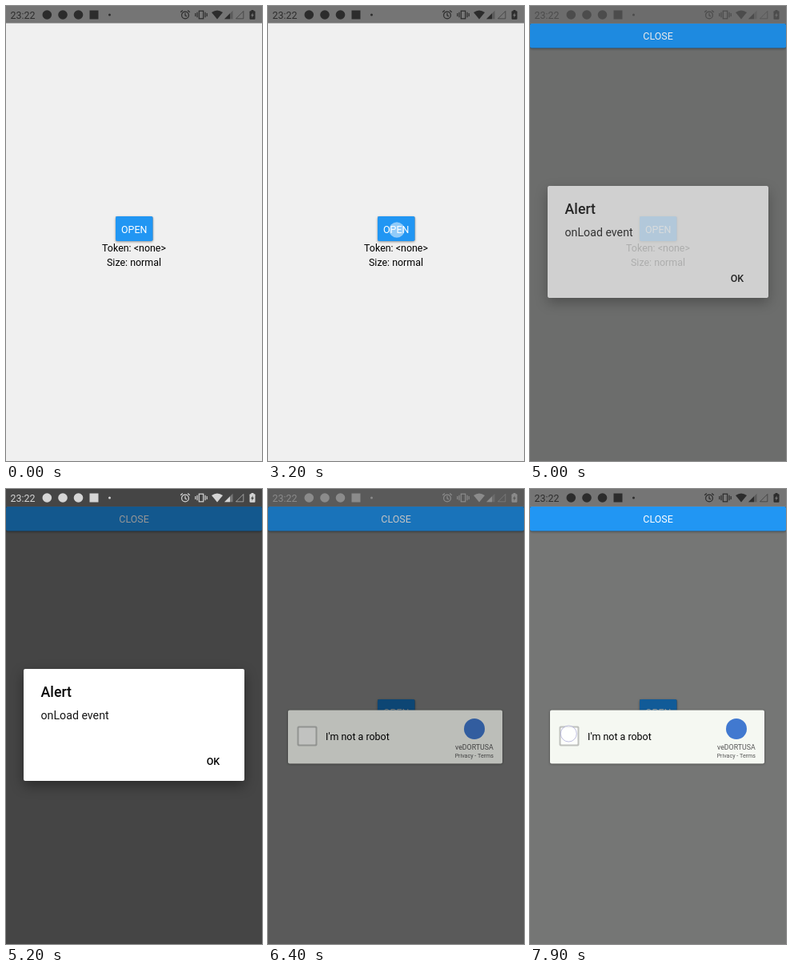
An HTML page with a canvas that plays this animation: 320 px wide and 569 px high, repeating every 8 s.

```html
<!DOCTYPE html>
<html lang="en">
<head>
<meta charset="utf-8">
<title>Verification dialog</title>
<style>
  html, body { margin: 0; width: 100%; height: 100%; overflow: hidden; background: #f0f0f0; }
  canvas { display: block; width: 100vw; height: 100vh; }
</style>
</head>
<body>
<canvas></canvas>
<script>
const W = 320, H = 569, LOOP = 8000, STEP = 100;
const BLUE = '#2196f3', BODY = 12.44;
const canvas = document.querySelector('canvas');
const ctx = canvas.getContext('2d');
const dpr = window.devicePixelRatio || 1;
canvas.width = Math.round(W * dpr);
canvas.height = Math.round(H * dpr);

const clamp = v => Math.max(0, Math.min(1, v));
const ease = v => { v = clamp(v); return v * v * (3 - 2 * v); };
const mix = (from, to, k) => 'rgb(' + from.map((c, i) => Math.round(c + (to[i] - c) * k)) + ')';

// Linear interpolation through [time, value] pairs.
function track(t, keys) {
  if (t <= keys[0][0]) return keys[0][1];
  for (let i = 1; i < keys.length; i++) {
    const [t0, v0] = keys[i - 1], [t1, v1] = keys[i];
    if (t <= t1) return v0 + (v1 - v0) * (t - t0) / (t1 - t0);
  }
  return keys[keys.length - 1][1];
}

const modalAt = t => track(t, [[3300, 0], [3600, 0.9], [3700, 1]]);
const dimAt = t => track(t, [[4900, 0], [5000, 0.15], [5200, 0.8], [5300, 1],
                             [6300, 1], [6400, 0.45], [6500, 0]]);
const alertAt = t => track(t, [[4900, 0], [5000, 0.68], [5100, 0.92], [5200, 1],
                               [6200, 1], [6300, 0.47], [6400, 0]]);

function text(str, x, y, size, color, align = 'left', weight = 400) {
  ctx.font = `${weight} ${size}px Roboto, sans-serif`;
  ctx.textAlign = align;
  ctx.fillStyle = color;
  ctx.fillText(str, x, y);
}

function box(x, y, w, h, r, color) {
  ctx.beginPath();
  ctx.roundRect(x, y, w, h, r);
  ctx.fillStyle = color;
  ctx.fill();
}

function disc(x, y, r, color) {
  ctx.beginPath();
  ctx.arc(x, y, r, 0, Math.PI * 2);
  ctx.fillStyle = color;
  ctx.fill();
}

function poly(points, closed = true) {
  ctx.beginPath();
  points.forEach(([x, y]) => ctx.lineTo(x, y));
  if (closed) ctx.closePath();
}

// Shadow is kept outside the box so translucent boxes stay clean.
function raised(x, y, w, h, color, blur, drop, strength) {
  ctx.save();
  ctx.beginPath();
  ctx.rect(0, 0, W, H);
  ctx.roundRect(x, y, w, h, 2);
  ctx.clip('evenodd');
  ctx.shadowColor = `rgba(0,0,0,${strength})`;
  ctx.shadowBlur = blur * dpr;
  ctx.shadowOffsetY = drop * dpr;
  box(x, y, w, h, 2, '#000');
  ctx.restore();
  box(x, y, w, h, 2, color);
}

function drawHome(modal) {
  ctx.fillStyle = '#f0f0f0';
  ctx.fillRect(0, 0, W, H);
  ctx.fillStyle = '#757575';
  ctx.fillRect(0, 0, W, 21.5);
  text('Token: <none>', 160, 307.3, BODY, '#000', 'center');
  text('Size: normal', 160, 324.5, BODY, '#000', 'center');

  ctx.fillStyle = `rgba(0,3,0,${0.51 * modal})`;
  ctx.fillRect(0, 21.5, W, H);
  raised(137, 263, 46.5, 31, mix([33, 150, 243], [17, 91, 152], modal), 3, 1, 0.4);
  text('OPEN', 160.2, 283.5, BODY, mix([255, 255, 255], [142, 156, 162], modal), 'center');
}

function drawCloseBar(modal) {
  ctx.globalAlpha = modal;
  raised(0, 22, W, 30.5, BLUE, 3, 1, 0.4);
  text('CLOSE', 160, 42, BODY, '#fff', 'center');
  ctx.globalAlpha = 1;
}

function drawSpinner(t) {
  const p = (t - 3600) / 1333;
  const k = p % 1;
  const base = -0.95 + p * 1.3 + Math.floor(p) * 4.7;
  const tail = base + 4.7 * ease(k * 2 - 1);
  const head = base + 0.75 + 4.7 * ease(k * 2);
  ctx.beginPath();
  ctx.arc(160, 295, 13, tail, head);
  ctx.strokeStyle = '#5f9c8c';
  ctx.lineWidth = 2.2;
  ctx.stroke();
}

function drawCheckCard() {
  raised(25, 276.5, 268, 67, '#f5f8f2', 3, 0.5, 0.4);
  box(36.5, 296.5, 25, 25, 2, '#bfc1bd');
  box(38.5, 298.5, 21, 21, 1, '#fcfdfb');
  text("I'm not a robot", 72, 314, BODY, '#000');
  disc(258, 300, 13, '#4179d0');
  text('veDORTUSA', 257.8, 326.3, 8.8, '#555', 'center');
  text('Privacy - Terms', 257.8, 336, 7.1, '#555', 'center');
}

function drawAlert(alpha) {
  ctx.globalAlpha = alpha;
  raised(22, 225, 276, 140, '#fff', 16, 6, 0.4);
  ctx.globalAlpha = 0.5 + alpha / 2;
  text('Alert', 43.5, 260.3, 17.8, '#050505', 'left', 500);
  text('onLoad event', 43.5, 287.5, 14.2, '#161616');
  text('OK', 259, 345, BODY, '#050505', 'center', 500);
  ctx.globalAlpha = 1;
}

function drawStatus(dim) {
  const c = mix([44, 44, 44], [255, 255, 255], dim);
  ctx.strokeStyle = c;
  ctx.lineWidth = 1.2;
  text('23:22', 5.5, 15.5, BODY, c);
  [51.3, 71, 90.5].forEach(x => disc(x, 11, 5.8, c));
  box(104.5, 5.5, 11, 11, 0, c);
  disc(129.5, 11, 1.5, c);

  // Alarm clock
  ctx.beginPath();
  ctx.arc(224, 11.5, 4.4, 0, Math.PI * 2);
  ctx.stroke();
  poly([[224, 8.8], [224, 11.8], [226, 13]], false);
  ctx.stroke();
  [-1, 1].forEach(s => {
    poly([[224 + s * 5.8, 7.8], [224 + s * 3.2, 5.5]], false);
    ctx.stroke();
  });

  // Vibrating phone
  ctx.strokeRect(241.3, 6.2, 5.4, 9.6);
  [[3.2, 5], [2, 7.2]].forEach(([half, dx]) => [-1, 1].forEach(s => {
    poly([[244 + s * dx, 11 - half], [244 + s * dx, 11 + half]], false);
    ctx.stroke();
  }));

  // Wi-Fi and two signal wedges
  ctx.fillStyle = c;
  ctx.beginPath();
  ctx.moveTo(264, 16.5);
  ctx.lineTo(257, 8);
  ctx.quadraticCurveTo(264, 3, 271, 8);
  ctx.fill();
  ctx.globalAlpha = 0.35;
  poly([[273, 16.3], [283.5, 16.3], [283.5, 5.8]]);
  ctx.fill();
  ctx.globalAlpha = 1;
  poly([[273, 16.3], [280, 16.3], [280, 9.3]]);
  ctx.fill();
  ctx.globalAlpha = 0.6;
  ctx.lineWidth = 1;
  poly([[287.5, 15.8], [296.8, 15.8], [296.8, 6.5]]);
  ctx.stroke();
  ctx.globalAlpha = 1;

  // Charging battery
  box(304.5, 6.2, 7, 10.6, 1, c);
  box(306.5, 5, 3, 2, 0, c);
  poly([[308.7, 8], [306, 12.2], [307.7, 12.2], [307.3, 15], [310, 10.8], [308.3, 10.8]]);
  ctx.fillStyle = mix([117, 117, 117], [56, 58, 54], dim);
  ctx.fill();
}

function drawTouch(x, y, r, alpha, rim) {
  disc(x, y, r, `rgba(255,255,255,${alpha})`);
  ctx.strokeStyle = rim;
  ctx.lineWidth = 1;
  ctx.stroke();
}

function draw(t) {
  const modal = modalAt(t), dim = dimAt(t), alert = alertAt(t);
  ctx.setTransform(canvas.width / W, 0, 0, canvas.height / H, 0, 0);
  drawHome(modal);
  if (modal > 0) drawCloseBar(modal);
  if (t >= 3700 && t < 5000) drawSpinner(t);
  if (t >= 5200) drawCheckCard();
  if (dim > 0) {
    ctx.fillStyle = `rgba(0,0,0,${0.52 * dim})`;
    ctx.fillRect(0, 0, W, H);
  }
  if (alert > 0) drawAlert(alert);
  drawStatus(dim);

  if (t >= 3200 && t < 3400) drawTouch(161, 280, 9.5, 0.5, 'rgba(255,255,255,0.15)');
  if (t >= 6200 && t < 6400) drawTouch(260, 348, 9.5, 0.4, 'rgba(200,200,215,0.35)');
  if (t >= 7900) drawTouch(48.3, 306, 10, 0.7, 'rgba(170,170,215,0.75)');
}

function tick() {
  const t = performance.now() % LOOP;
  draw(Math.floor(t / STEP) * STEP);
  requestAnimationFrame(tick);
}
tick();
</script>
</body>
</html>
```
